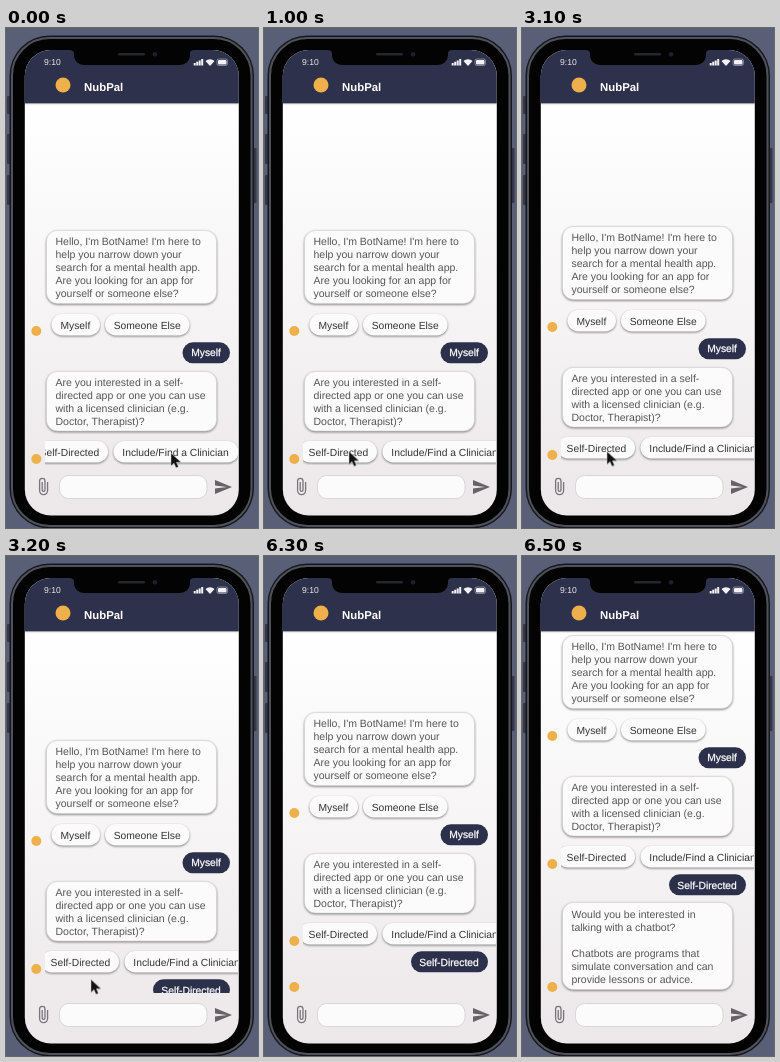
An HTML page for the animation above (8 s loop, 252x500 px).

```html
<!DOCTYPE html>
<html lang="en">
<head>
<meta charset="utf-8">
<title>Chat assistant</title>
<style>
html, body { margin: 0; width: 100%; height: 100%; overflow: hidden; background: #5a5f78; }
svg { display: block; width: 252px; height: 500px; }
text { font: 10.3px "Liberation Sans", Arial, sans-serif; fill: #333; text-rendering: geometricPrecision; }
.say text { font-size: 10.5px; fill: #555; }
.time { font-size: 8.6px; fill: #e8e8ee; }
.title { font-size: 11.4px; font-weight: bold; fill: #fff; }
.card { fill: #fcfbfc; filter: drop-shadow(0 1px 1.1px #0007); }
.say .card { stroke: #d2d0d3; stroke-width: .6; }
.reply rect { fill: #2d304b; }
.reply text { fill: #fff; stroke: #fff; stroke-width: .25; }
.mark { fill: #eeb04a; }

.feed, .strip, .cursor, .answer, .avatar { animation: 8s step-end infinite; }
.feed { animation-name: feed; }
.strip { animation-name: strip; }
.cursor { animation-name: cursor; }
.answer { animation-name: answer; }
.avatar { animation-name: avatar; }

@keyframes feed {
  0% { transform: translateY(0); }
  38.75% { transform: translateY(-4px); }
  40% { transform: translateY(-18px); }
  41.25% { transform: translateY(-29px); }
  78.75% { transform: translateY(-46px); }
  80% { transform: translateY(-95px); }
  81.25%, 100% { transform: translateY(-123px); }
}
@keyframes strip {
  0% { transform: translateX(-11px); }
  3.75% { transform: translateX(-4px); }
  5%, 100% { transform: translateX(0); }
}
@keyframes cursor {
  0% { transform: translate(165px, 425px); opacity: 1; }
  7.5% { transform: translate(163px, 425px); }
  8.75% { transform: translate(160px, 425px); }
  10% { transform: translate(138px, 426px); }
  11.25% { transform: translate(104px, 425px); }
  12.5% { transform: translate(85px, 423.5px); opacity: 1; }
  47.5% { transform: translate(85px, 423.5px); opacity: .5; }
  48.75%, 100% { transform: translate(85px, 423.5px); opacity: 0; }
}
@keyframes answer {
  0% { opacity: 0; }
  80% { opacity: .6; }
  81.25%, 100% { opacity: 1; }
}
@keyframes avatar {
  0% { opacity: 0; }
  78.75%, 100% { opacity: 1; }
}
</style>
</head>
<body>
<svg viewBox="0 0 252 500">
  <defs>
    <linearGradient id="paper" x2="0" y2="1">
      <stop offset=".15" stop-color="#fefefe"/>
      <stop offset=".55" stop-color="#f6f4f5"/>
      <stop offset="1" stop-color="#ece7e9"/>
    </linearGradient>
    <clipPath id="screen"><rect x="18.8" y="22" width="214" height="465.5" rx="26"/></clipPath>
    <clipPath id="view"><rect x="18" y="75" width="216" height="362"/></clipPath>
    <clipPath id="lane"><rect x="39.5" y="408" width="192.5" height="32"/></clipPath>
  </defs>

  <!-- phone body -->
  <g fill="#343748">
    <rect x="1" y="68" width="4" height="18" rx="1"/>
    <rect x="1" y="106" width="4" height="30" rx="1"/>
    <rect x="1" y="147" width="4" height="30" rx="1"/>
    <rect x="246.5" y="120" width="4" height="55" rx="1"/>
  </g>
  <rect x="3.5" y="7.5" width="244.5" height="493" rx="40" fill="#17181d"/>
  <rect x="6" y="10" width="239.5" height="488" rx="37.5" fill="#030304" stroke="#50525b" stroke-width="2"/>

  <g clip-path="url(#screen)">
    <rect x="18" y="22" width="216" height="466" fill="url(#paper)"/>

    <g clip-path="url(#view)">
      <g class="feed">
        <g class="say">
          <rect class="card" x="40.5" y="202.5" width="170" height="73" rx="11"/>
          <text y="216.5">
            <tspan x="49.5">Hello, I'm BotName! I'm here to</tspan>
            <tspan x="49.5" dy="13">help you narrow down your</tspan>
            <tspan x="49.5" dy="13">search for a mental health app.</tspan>
            <tspan x="49.5" dy="13">Are you looking for an app for</tspan>
            <tspan x="49.5" dy="13">yourself or someone else?</tspan>
          </text>
        </g>
        <circle class="mark" cx="30.3" cy="303" r="5"/>
        <rect class="card" x="45.5" y="286" width="48.5" height="21.5" rx="10.7"/>
        <text x="54.5" y="300.5">Myself</text>
        <rect class="card" x="99" y="286" width="84.5" height="21.5" rx="10.7"/>
        <text x="107.7" y="300.5">Someone Else</text>

        <g class="reply">
          <rect x="176.5" y="314.3" width="47.5" height="21" rx="10.5"/>
          <text x="185.2" y="328.3">Myself</text>
        </g>

        <g class="say">
          <rect class="card" x="40.5" y="343.5" width="170" height="59.5" rx="11"/>
          <text y="357.5">
            <tspan x="49.5">Are you interested in a self-</tspan>
            <tspan x="49.5" dy="13">directed app or one you can use</tspan>
            <tspan x="49.5" dy="13">with a licensed clinician (e.g.</tspan>
            <tspan x="49.5" dy="13">Doctor, Therapist)?</tspan>
          </text>
        </g>
        <circle class="mark" cx="30.3" cy="431" r="5"/>
        <g clip-path="url(#lane)">
          <g class="strip">
            <rect class="card" x="35" y="413" width="78" height="21.5" rx="10.7"/>
            <text x="44.6" y="427.5">Self-Directed</text>
            <rect class="card" x="118.5" y="413" width="125" height="21.5" rx="10.7"/>
            <text x="127.3" y="427.5">Include/Find a Clinician</text>
          </g>
        </g>

        <g class="reply">
          <rect x="147" y="441.3" width="77" height="21" rx="10.5"/>
          <text x="155.3" y="455.5">Self-Directed</text>
        </g>

        <g class="say answer">
          <rect class="card" x="40.5" y="469.5" width="170" height="87" rx="11"/>
          <text y="484.5">
            <tspan x="49.5">Would you be interested in</tspan>
            <tspan x="49.5" dy="13">talking with a chatbot?</tspan>
            <tspan x="49.5" dy="26">Chatbots are programs that</tspan>
            <tspan x="49.5" dy="13">simulate conversation and can</tspan>
            <tspan x="49.5" dy="13">provide lessons or advice.</tspan>
          </text>
        </g>
      </g>
      <circle class="mark avatar" cx="30.3" cy="431" r="5"/>
    </g>

    <!-- input bar -->
    <path d="M41.6 454v8.6a4 4 0 0 1-8 0v-9.6a2.7 2.7 0 0 1 5.4 0v9a1.4 1.4 0 0 1-2.8 0V454" fill="none" stroke="#77757a" stroke-width="1.3"/>
    <rect x="53.5" y="447.5" width="147.5" height="23" rx="9" fill="#fcfbfc" stroke="#d8d5d8"/>
    <path d="M209 452l17 7-17 7v-5.4l12-1.6-12-1.6z" fill="#656368"/>

    <!-- header -->
    <rect x="18" y="22" width="216" height="53.3" fill="#2e314b" style="filter: drop-shadow(0 .6px 1px #0006)"/>
    <text class="time" x="38" y="37.2">9:10</text>
    <circle class="mark" cx="57" cy="57" r="7.5"/>
    <text class="title" x="78" y="63">NubPal</text>
    <g fill="#f2f2f6">
      <path d="M187.7 35h2v2.5h-2zM190.2 33.8h2v3.7h-2zM192.7 32.5h2v5h-2zM195.2 31h2v6.5h-2z"/>
      <path d="M204 38l-4.5-5a6.5 6.5 0 0 1 9 0z"/>
      <rect x="212" y="32" width="8.5" height="4.5" rx="1"/>
    </g>
    <rect x="211" y="31" width="10.5" height="6.5" rx="1.8" fill="none" stroke="#b9bac6" stroke-width=".6"/>
    <path d="M62 21h127v1c-4 0-5 1-5 4 0 7-4 11-11 11H79c-7 0-11-4-11-11 0-3-1-4-6-4z" fill="#030304"/>
  </g>

  <rect x="112" y="25" width="27" height="2.6" rx="1.3" fill="#25262e"/>
  <circle cx="149" cy="26.3" r="2.2" fill="#1c2034"/>

  <path class="cursor" d="M0 0v13l3-2.8 2 4.6 2.4-1-2-4.5H10z" fill="#111" stroke="#ccc" stroke-width=".5"/>
</svg>
</body>
</html>
```
